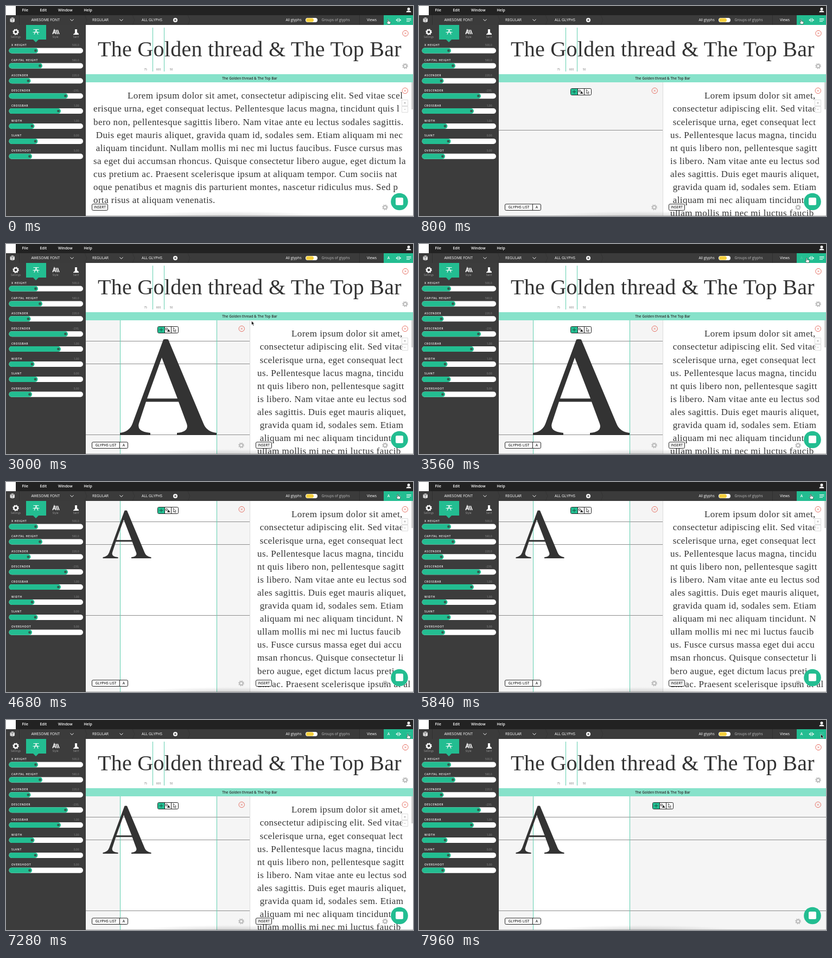
Write an HTML page that moves like this. It is 750 px wide and 388 px high and loops after 8000 ms.

```html
<!DOCTYPE html>
<html lang="en">
<head>
<meta charset="utf-8">
<title>Font editor views</title>
<style>
  html, body { margin: 0; width: 100%; height: 100%; overflow: hidden; background: #fff; }
  svg { display: block; width: 100vw; height: 100vh; }
  text { font: 400 6.8px "Open Sans", sans-serif; fill: #fff; }
  .bold { font-weight: 600; }
  .mid { text-anchor: middle; }
  .label { font-size: 5px; font-weight: 600; letter-spacing: .7px; }
  .value { font-size: 5px; fill: #858585; text-anchor: end; }
  .tiny { font-size: 5px; text-anchor: middle; fill: #999; }
  .width { font-size: 5px; text-anchor: middle; fill: #777; }
  .button { font-size: 6.5px; font-weight: 600; text-anchor: middle; fill: #2f2f2f; }
  .small { font-size: 6.6px; }
  .title { font: 40px "Liberation Serif", serif; letter-spacing: .28px; fill: #333; }
  .body text { font: 17px "Liberation Serif", serif; letter-spacing: .43px; fill: #333; }
  .box { fill: #fff; stroke: #222; }
  .guide { stroke: #62cfb0; }
  .rule { stroke: #8c8c8c; }
  .line { fill: none; stroke: #fff; }
</style>
</head>
<body>
<svg viewBox="0 0 750 388" xml:space="preserve">
  <defs>
    <radialGradient id="shade"><stop offset="0" stop-color="#000" stop-opacity=".16"/><stop offset="1" stop-color="#000" stop-opacity="0"/></radialGradient>
    <g id="close" fill="none" stroke="#e66e61"><circle r="5.2"/><path d="M-1.8-1.8L1.8 1.8M1.8-1.8L-1.8 1.8" stroke-width=".8"/></g>
    <g id="gear" fill="none" stroke="#bcbcbc"><circle r="3.1" stroke-width="2"/><circle r="4.6" stroke-width="1.6" stroke-dasharray="1.8 1.813"/></g>
    <g id="zoom" fill="#fff" fill-opacity=".8" stroke="#dcdcdc"><path d="M729.5 173.5h11v11h-11zM729.5 185.5h11v11h-11z"/><path d="M733 179h4M735 177v4M733.5 191h3" stroke="#aaa" stroke-width=".8"/></g>
    <g id="tools">
      <rect class="box" x="279.5" y="152.5" width="38" height="12" rx="2"/>
      <path d="M280 153h12v11h-12z" fill="#23bd91"/>
      <path d="M292.5 152v13M304.5 152v13" stroke="#222"/>
      <path d="M282.5 158.5h7M286 155v7" stroke="#174d3e" stroke-width=".9"/>
      <path d="M294.5 155.5h3v3h-3z" fill="none" stroke="#222" stroke-width=".8"/><path d="M297 162l2.5-5 3 5z" fill="#222"/>
      <path d="M308.5 154.5v7l1.8-1.5 1.2 2.7 1-.5-1.1-2.5h2z" fill="#fff" stroke="#222" stroke-width=".7"/>
    </g>
  </defs>

  <rect x="147" y="35" width="603" height="353" fill="#fff"/>

  <g id="lower">
    <g id="glyphPanel">
      <rect id="glyphBack" x="147" y="141" height="354" fill="#f5f5f5"/>
      <path id="emptyRule" class="rule" d="M147 229.5H449"/>
      <g id="drawing">
        <rect x="210" y="80" width="178" height="430" fill="#fff"/>
        <path class="rule" d="M147 179.5H750M147 221.5H750M147 352.5H750"/>
        <path class="guide" d="M210.5 80V510M388.5 80V510"/>
      </g>
      <path id="letter" fill="#333" fill-rule="evenodd" d="M290 176.5Q294.5 175 299 176.5L364 332Q370 347 388 349V353H315V349Q338 347 333 332L318 291.5H258L245 331Q240 347 266 349V353H210V349Q227 347 233 332ZM287 210L260 285.5H316Z"/>
    </g>
    <g id="textPanel">
      <rect id="textBack" y="141" height="354" fill="#fff"/>
      <path id="divider" d="M449.5 141V495" stroke="#dcdcdc"/>
      <g id="wide" class="body"></g><g id="narrow" class="body"></g>
      <use href="#zoom"/><path d="M748.5 141v50" stroke="#c8c8c8" stroke-width="2.5"/>
    </g>
    <use id="toolbar" href="#tools"/>
    <use id="glyphClose" href="#close" x="434.3" y="156.5"/>
    <use href="#close" x="735.3" y="156.5"/>
  </g>

  <g id="wordPanel">
    <rect x="147" y="35" width="603" height="91" fill="#fff"/>
    <text class="title" x="169" y="93">The Golden thread &amp; The Top Bar</text>
    <path class="guide" d="M270.5 40V121M291.5 40V121"/>
    <text class="width" x="257" y="119">75</text><text class="width" x="281" y="119">600</text><text class="width" x="304.5" y="119">50</text>
    <use href="#close" x="736" y="50.5"/><use href="#gear" x="735.5" y="111"/>
    <rect x="147" y="126" width="603" height="15" fill="#87e2ca"/>
    <text class="button" x="449" y="136.2" style="font-size:6.4px">The Golden thread &amp; The Top Bar</text>
  </g>

  <ellipse cx="410" cy="389" rx="175" ry="10" fill="url(#shade)"/>
  <path d="M147 387.5H750" stroke="#777" opacity=".5"/>
  <g id="glyphFooter">
    <rect class="box" x="158.5" y="366" width="66" height="11.5" rx="2"/>
    <path d="M209.5 366v11.5" stroke="#222"/>
    <text class="button" x="184" y="374.2">GLYPHS LIST</text><text class="button" x="217" y="374.2">A</text>
  </g>
  <use id="glyphGear" href="#gear" x="433.5" y="372"/>
  <use href="#gear" x="698.5" y="372"/>
  <g id="insert">
    <rect class="box" x="158.5" y="366" width="29" height="11.5" rx="2"/>
    <text class="button" x="173" y="374.3">INSERT</text>
  </g>
  <circle cx="725" cy="361.5" r="15.8" fill="#23bd91"/>
  <rect x="718" y="354" width="14" height="14" rx="2.5" fill="#fff"/>

  <g id="sidebar">
    <rect y="35" width="147" height="353" fill="#3c3c3c"/>
    <path d="M37 35h37v27H60l-5 5-5-5H37z" fill="#23bd91"/>
    <g class="line" stroke-width="1.2">
      <circle cx="18" cy="48" r="3.6" stroke-width="2.4"/><circle cx="18" cy="48" r="5" stroke-width="1.5" stroke-dasharray="2 1.927"/>
      <path d="M49.5 48.5h12M52 52.5l3.5-8.5 3.5 8.5M50.5 43.5h10"/>
      <path d="M86 52l3-8 3 8M87 49.500h4M92 44l3 8M95 44l3 8" stroke-width="1.6"/>
    </g>
    <path d="M127 43h4v6q3 1 3 3v1h-10v-1q3-1 3-3z" fill="#fff"/>
    <text class="tiny" x="18" y="59">Settings</text><text class="tiny" x="91" y="59">Style</text><text class="tiny" x="129" y="59">Serif</text>
  </g>

  <rect width="750" height="17" fill="#222"/>
  <rect y="17" width="750" height="18" fill="#3b3b3b"/>
  <path d="M24.5 17v18M651.5 17v18" stroke="#303030"/>
  <path d="M145 17l4 9-4 9M233 17l4 9-4 9M335 17l4 9-4 9" fill="none" stroke="#343434"/>
  <rect width="18" height="17" fill="#fff"/>
  <path d="M7.5 23l4 1.5v6l-4-1.5zM12 24.5l4-1.500v6l-4 1.5zM8 22.5l3.8-1.3 3.8 1.3-3.8 1.2z" fill="#ddd"/>
  <text class="bold" x="29.5" y="9.8">File</text><text class="bold" x="62.5" y="9.8">Edit</text><text class="bold" x="96" y="9.8">Window</text><text class="bold" x="143.5" y="9.8">Help</text>
  <circle cx="742" cy="5.5" r="2.5" fill="#fff"/><path d="M737.5 11.5q0-3 4.5-3t4.5 3z" fill="#fff"/>
  <text x="46.5" y="28.3">AWESOME FONT</text><text x="159" y="28.3">REGULAR</text><text x="250" y="28.3">ALL GLYPHS</text>
  <path class="line" d="M118.5 24.5l3 3 3-3M209.5 24.5l3 3 3-3"/>
  <circle cx="312" cy="26" r="4" fill="#fff"/><path d="M309.8 26h4.4M312 23.8v4.4" stroke="#333"/>
  <text class="small" x="515.5" y="28.3">All glyphs</text>
  <rect x="552" y="22" width="22" height="8" rx="4" fill="#fff"/><rect x="553" y="22.5" width="14" height="7" rx="3.5" fill="#f5cf3d"/>
  <text class="small" x="581.5" y="28.3" style="fill:#bbb">Groups of glyphs</text><text x="665" y="28.3">Views</text>
  <rect x="696" y="17" width="54" height="18" fill="#23bd91"/>
  <g id="views">
    <text class="bold mid" x="705" y="28.3">A</text>
    <g><path class="line" d="M722 22.5v7M724.5 22.5v7"/><path d="M718.3 26l2.4-2.2v4.4zM728.2 26l-2.4-2.2v4.4z" fill="#fff"/></g>
    <path class="line" d="M738 23.5h8.5M738 26h8.5M738 28.5h6"/>
  </g>

  <g id="pointer" stroke-width=".6">
    <path id="arrow" d="M0 0v7.5l1.7-1.5 1.3 3 1.4-.6-1.3-2.9h2.3z" fill="#111" stroke="#fff"/>
    <path id="hand" d="M-.8 0q.8-.8 1.6 0v3l3.2.8q1.2.4.8 2l-.8 2.7h-4.3l-2.3-3.3q0-1.2 1.8-.2z" fill="#fff" stroke="#222"/>
  </g>
</svg>
<script>
const LOOP = 8000;
const $ = id => document.getElementById(id);
const show = (id, on) => $(id).style.display = on ? '' : 'none';
const move = (id, x, y) => $(id).setAttribute('transform', `translate(${x} ${y})`);

const wideLines = [
  'Lorem ipsum dolor sit amet, consectetur adipiscing elit. Sed vitae scel',
  'erisque urna, eget consequat lectus. Pellentesque lacus magna, tincidunt quis l',
  'bero non, pellentesque sagittis libero. Nam vitae ante eu lectus sodales sagittis.',
  ' Duis eget mauris aliquet, gravida quam id, sodales sem. Etiam aliquam mi nec',
  ' aliquam tincidunt. Nullam mollis mi nec mi luctus faucibus. Fusce cursus mas',
  'sa eget dui accumsan rhoncus. Quisque consectetur libero augue, eget dictum la',
  'cus pretium ac. Praesent scelerisque ipsum at aliquam tempor. Cum sociis nat',
  'oque penatibus et magnis dis parturient montes, nascetur ridiculus mus. Sed p',
  'orta risus at aliquam venenatis.'];
const narrowLines = [
  'Lorem ipsum dolor sit amet,',
  ' consectetur adipiscing elit. Sed vitae',
  ' scelerisque urna, eget consequat lect',
  'us. Pellentesque lacus magna, tincidu',
  'nt quis libero non, pellentesque sagitt',
  'is libero. Nam vitae ante eu lectus sod',
  'ales sagittis. Duis eget mauris aliquet,',
  ' gravida quam id, sodales sem. Etiam',
  ' aliquam mi nec aliquam tincidunt. N',
  'ullam mollis mi nec mi luctus faucib',
  'us. Fusce cursus massa eget dui accu',
  'msan rhoncus. Quisque consectetur li',
  'bero augue, eget dictum lacus preti',
  'um ac. Praesent scelerisque ipsum at al'];
const setLines = (id, x, lines) => $(id).innerHTML = lines.map((line, i) =>
  `<text xml:space="preserve" x="${i ? x : x + 63}" y="${171.3 + 24.1 * i}">${line}</text>`).join('');
setLines('wide', 161, wideLines);
setLines('narrow', 463, narrowLines);

const sliders = [
  ['X HEIGHT', '500,0', 54.5], ['CAPITAL HEIGHT', '580,0', 62.5],
  ['ASCENDER', '220,0', 41], ['DESCENDER', '-230,', 109.5],
  ['CROSSBAR', '1,00', 96.5], ['WIDTH', '1,00', 48],
  ['SLANT', '0,00', 54], ['OVERSHOOT', '5,00', 43.5]];
$('sidebar').innerHTML += sliders.map(([name, value, x], i) => {
  const y = 82.5 + 27.9 * i;
  return `<text class="label" x="10" y="${y - 8.5}">${name}</text>
    <text class="value" x="134.5" y="${y - 8.5}">${value}</text>
    <rect x="5.5" y="${y - 5}" width="136.5" height="10" rx="5" fill="#fff"/>
    <rect x="5.5" y="${y - 5}" width="${x - 1}" height="10" rx="5" fill="#23bd91"/>
    <circle cx="${x}" cy="${y}" r="2.4" fill="#315c4e"/>`;
}).join('');

// time, x, y of the pointer tip
const path = [
  [0, 704, 25], [1200, 704, 25], [1960, 346.5, 189], [2760, 346.5, 189],
  [3440, 714.5, 26], [3640, 714.5, 26], [3840, 722, 23], [6160, 722, 23],
  [6240, 721.5, 22], [6700, 721.5, 22], [7100, 740.5, 26], [LOOP, 740.5, 26]];

function pointerAt(t) {
  const i = path.findIndex(p => p[0] > t);
  const [a, b] = [path[i - 1], path[i]];
  const k = (t - a[0]) / (b[0] - a[0]);
  const ease = k * k * (3 - 2 * k);
  return [1, 2].map(n => a[n] + (b[n] - a[n]) * ease);
}

function draw(t) {
  const glyph = t >= 640, drawn = t >= 960;
  const half = t >= 4160;
  const word = !half || t >= 6200;
  const settling = t >= 6200 && t < 6600;
  const text = t < 7440;
  const split = glyph && text;
  const shift = settling ? 53 : 0;

  show('wordPanel', word);
  move('lower', 0, word ? 0 : -106);
  for (const id of ['glyphPanel', 'toolbar', 'glyphFooter']) show(id, glyph);
  for (const id of ['divider', 'narrow', 'glyphClose', 'glyphGear']) show(id, split);
  for (const id of ['textPanel', 'insert']) show(id, text);
  for (const id of ['drawing', 'letter']) show(id, drawn);
  show('wide', !glyph);
  show('emptyRule', !drawn);
  $('glyphBack').setAttribute('width', split ? 302 : 603);
  $('textBack').setAttribute('x', split ? 449 : 147);
  $('textBack').setAttribute('width', split ? 301 : 603);
  move('drawing', 0, shift);
  $('letter').setAttribute('transform',
    `translate(147 141) scale(${half ? 0.5 : 1}) translate(-147 ${shift - 141})`);
  move('toolbar', text ? 0 : 151, 0);
  move('insert', split ? 302 : 0, 0);

  const [x, y] = pointerAt(t);
  const over = x >= 697 && y < 35 ? Math.floor((x - 697) / 18) : -1;
  [...$('views').children].forEach((icon, i) => icon.style.opacity = i === over ? 0.15 : 1);
  const hand = over >= 0 && !settling && text;
  show('hand', hand);
  show('arrow', !hand);
  move('pointer', x, y);
}

const start = performance.now();
function tick(now) {
  draw(Math.max(0, now - start) % LOOP);
  requestAnimationFrame(tick);
}
draw(0);
requestAnimationFrame(tick);
</script>
</body>
</html>
```
